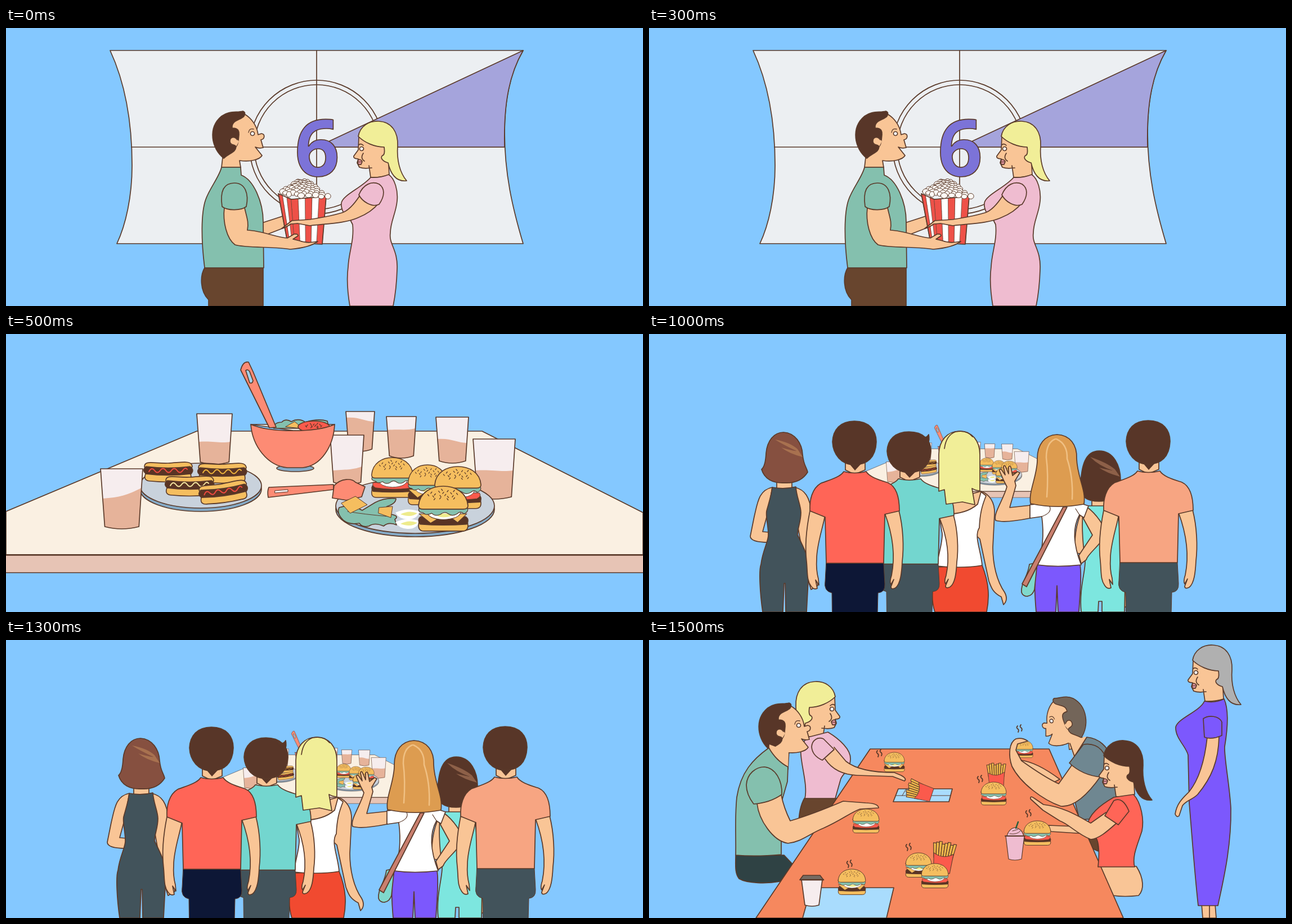
These frames come from a looping animation (1132x495 px, 2 s). An HTML page with a canvas:

```html
<!DOCTYPE html>
<html lang="en">
<head>
<meta charset="utf-8">
<style>
html, body { margin: 0; height: 100%; overflow: hidden; background: #84c8ff }
canvas { display: block }
</style>
</head>
<body>
<canvas id="stage" width="1132" height="495"></canvas>
<script>
const c = document.getElementById('stage').getContext('2d');
const SKY = '#84c8ff', INK = '#5a3a2a', SKIN = '#f9c596', PINK = '#efbcd0', GREEN = '#84c0ae', BUN = '#f5be5f',
  RED = '#fb5a4c', SLATE = '#42535b', VIOLET = '#7c58fd', BROWN = '#583628', BLONDE = '#f1ee98', CREAM = '#f6edee', MAT = '#a9dcfd';

function shape(fill, d, width = 1.7, ink = INK) {
  const path = new Path2D(d);
  if (fill) { c.fillStyle = fill; c.fill(path); }
  if (width) { c.lineWidth = width; c.strokeStyle = ink; c.stroke(path); }
}
const line = (d, width, ink) => shape(null, d, width, ink);
const oval = (fill, x, y, rx, ry = rx, width) =>
  shape(fill, `M${x - rx} ${y}a${rx} ${ry} 0 1 0 ${2 * rx} 0a${rx} ${ry} 0 1 0 ${-2 * rx} 0Z`, width);
function at(x, y, sx, sy, draw, turn = 0) {
  c.save();
  c.translate(x, y);
  c.rotate(turn);
  c.scale(sx, sy);
  draw();
  c.restore();
}

// ---- profile heads ----
function manHead(hair) {
  shape(SKIN, 'M386 222L383 248H417L415 236C435 239 451 234 455 227L443 212Q450 215 457 213L453 199C460 198 461 189 454 188L448 190C446 173 435 160 425 154L395 170Z');
  shape(hair, 'M387 232C365 215 358 178 383 157C396 147 410 151 421 148Q427 150 423 157C418 164 400 164 402 178C415 178 414 186 414 190L413 200Q412 208 409 211C408 222 398 222 387 232Z');
  shape(SKIN, 'M411 198C405 191 397 195 398 203C400 211 406 206 409 211L414 202', 0);
  line('M411 199C405 191 397 195 398 203C400 210 405 206 409 211');
  oval('#fff', 438, 188, 3.5);
  line('M431 186Q432 178 440 180', 1.3);
}
function womanHead(hair) {
  shape(SKIN, 'M645 245L648 266Q665 267 681 262L679 225L660 190L627 193L626 217L618 228Q617 233 626 233L624 240L628 248Q636 251 650 249');
  shape(hair, 'M626 193C629 175 645 165 662 166C686 167 697 186 696 210C694 235 700 258 712 272C695 274 684 262 679 240C670 238 664 231 669 227Q674 226 672 212C655 212 637 204 626 193Z');
  oval('#fff', 632, 215, 3.5);
  shape('#dc909a', 'M626 234Q632 234 633 238L631 243Q625 244 625 240Z');
  line('M625 239L632 238', 1);
  line('M627 208Q631 205 635 209M635 223Q629 232 637 237');
}

// ---- food ----
function seeds(count, cx, cy, rx, ry) {
  for (let i = 0; i < count; i++) {
    const a = i * 2.4, r = Math.sqrt((i + .5) / count);
    line(`M${cx + rx * r * Math.cos(a)} ${cy + ry * r * Math.sin(a)}l${i % 2 ? 2 : -2} 2.5`, 1.3);
  }
}
function burger(x, y, width, tomato, height = width * .88) {
  at(x, y, width / 90, height / 79, () => {
    shape(BUN, 'M3 62H87Q91 78 78 78H12Q-1 78 3 62Z');
    shape('#5a3424', 'M6 53H84Q91 58 86 66Q45 69 5 66Q-1 58 6 53Z');
    if (tomato) shape(RED, 'M5 49H85Q90 55 80 60Q45 64 10 59Q2 55 5 49Z', 1);
    else shape(BUN, 'M3 48L23 64L40 54H58L70 63L86 48Z', 1);
    shape('#fff', 'M16 43H76Q75 57 45 58Q18 57 16 43Z', 1);
    if (!tomato) shape('#eeeb8d', 'M32 49Q45 46 61 49Q58 54 46 54Q35 54 32 49Z', 0);
    shape(GREEN, 'M3 38H87Q90 44 81 48Q75 42 69 48Q61 53 54 48Q47 43 40 49Q31 53 25 47Q15 52 10 46Q0 45 3 38Z', 1.2);
    shape(BUN, 'M2 34C4 10 25 0 45 0S86 10 88 34Q88 40 80 40H10Q2 40 2 34Z');
    seeds(19, 45, 14, 28, 10);
  });
}
function hotdog(x, y, sauce, turn) {
  at(x, y, 1, 1, () => {
    shape(BUN, 'M2 9C2-3 20 4 44 3S86-3 87 9L84 15H5Z');
    shape('#5a3424', 'M5 9Q44 14 83 9Q92 15 84 23Q44 28 6 23Q-4 16 5 9Z');
    line('M10 18q5-9 10-2t10 0t10 0t10 0t10 0t10 0t8-2', 2, sauce);
    shape(BUN, 'M4 22Q44 27 84 22Q88 36 74 35Q44 38 14 35Q-1 35 4 22Z');
  }, turn);
}
function glass(x, y, w, h, left, right) {
  const edge = level => .1 * w * (level - y) / h, bottom = y + h - 4;
  const base = `L${x + w * .91} ${bottom}Q${x + w / 2} ${y + h + 4} ${x + w * .1} ${bottom}Z`;
  shape(CREAM, `M${x} ${y}H${x + w}${base}`, 0);
  shape('#e6b39a', `M${x + edge(left)} ${left}C${x + w * .45} ${left - 2} ${x + w * .65} ${(left + right) / 2 + 3} ${x + w - edge(right)} ${right}${base}`, 0);
  line(`M${x} ${y}H${x + w}${base}`);
}
function plate(x, y, rx, ry) {
  oval('#85aac6', x, y + 6, rx, ry);
  oval('#c9d2dc', x, y, rx, ry);
}
function fries(x, y, size, turn = 0) {
  at(x, y, size, size, () => {
    for (let i = 0; i < 8; i++) shape('#efb84c', `M${i * 4 + 3} 28L${i * 5 - 1} ${3 - i % 3 * 2}h5L${i * 4 + 7} 28Z`, 1.2);
    shape(RED, 'M2 20Q19 30 36 18L34 52H6Z', 1);
  }, turn);
}
function steam(x, y) {
  for (const dx of [0, 6]) line(`M${x + dx} ${y - dx / 3}q-3 3 0 5t1 6`, 1.8);
}

// ---- scenes ----
function stripe(top, bottom, count) {
  const edge = ([x1, y1, x2, y2], k) => `${x1 + (x2 - x1) * k} ${y1 + (y2 - y1) * k}`;
  for (let i = 0; i < count; i++)
    shape(i % 2 ? '#fff' : '#ee5148', `M${edge(top, i / count)}L${edge(top, (i + 1) / count)}L${edge(bottom, (i + 1) / count)}L${edge(bottom, i / count)}Z`, .6);
}
function cinema() {
  shape('#eceff2', 'M185 40H919C895 80 886 130 886 185C886 260 900 320 919 384H197C213 350 224 300 224 245C224 180 215 105 185 40Z');
  line('M223 212H886M552 40V384');
  oval(null, 552, 212, 119);
  oval(null, 552, 212, 111);
  shape('#a5a4dc', 'M552 212L919 40C896 80 884 130 886 212Z');
  c.font = '700 140px "Open Sans", sans-serif';
  c.textAlign = 'center';
  c.fillStyle = '#7c73d8';
  c.fillText('6', 553, 264);
  c.strokeText('6', 553, 264);

  shape(SKIN, 'M455 347L498 333L501 353L455 371Z');
  stripe([484, 295, 507, 305], [500, 380, 513, 383], 3);
  stripe([507, 305, 569, 300], [513, 383, 562, 385], 5);
  line('M484 295L507 305L569 300L562 385L513 383L500 380Z');
  for (let i = 0; i < 60; i++) {
    const v = i / 60, u = i * .618 % 1 * 2 - 1;
    oval('#fffaf5', 528 + u * (9 + 39 * v), 273 + 26 * v + u * 3 * v, 4.5 + i % 3 * .8, 4 + i % 2, 1);
  }

  shape('#68452e', 'M353 427H457V495H360V484C344 468 345 440 353 427Z');
  manHead(BROWN);
  shape(GREEN, 'M383 248H417L418 262C440 270 457 310 457 345L458 427H353C347 380 346 330 355 305C362 285 379 265 383 248Z');
  shape(SKIN, 'M388 320C385 345 392 375 407 386C425 392 480 389 505 394Q540 391 554 380Q535 384 522 379L510 376L519 370Q519 366 512 367L500 374C480 373 455 361 429 360C432 345 427 335 424 320');
  shape(GREEN, 'M384 318C380 290 387 276 406 276S432 295 427 318C418 325 394 326 384 318Z');

  womanHead(BLONDE);
  shape(PINK, 'M648 266Q665 267 680 261C691 268 697 290 695 308C693 330 683 345 683 365C680 385 697 395 695 430Q694 465 688 495H611C606 465 606 440 608 425C609 400 619 378 616 350L612 342C600 335 595 320 596 312C597 298 633 284 648 266Z');
  shape(SKIN, 'M629 298C618 315 607 326 597 329C570 337 555 338 540 341L508 343L490 357Q500 354 506 349L518 348L540 352C575 348 605 347 625 338Q650 328 663 311');
  shape(PINK, 'M627 297C635 278 650 272 663 278C673 285 674 298 663 314C650 320 633 309 627 297Z');
}

function feast() {
  shape('#faf0e2', 'M339 173H846L1132 318V393H0V316Z');
  shape('#e7c4b5', 'M-2 393H1134V425H-2Z');
  line('M0 393.5H1132', 2.4);
  glass(604, 138, 51, 71, 149, 156);
  glass(676, 147, 53, 74, 171, 168);
  glass(764, 148, 58, 82, 187, 194);
  glass(830, 187, 75, 107, 243, 243);
  glass(339, 142, 63, 90, 192, 192);
  glass(576, 180, 60, 88, 243, 236);

  oval('#85aac6', 514, 239, 33, 6);
  shape('#e6e6e2', 'M435 161H584Q550 175 510 172Z');
  shape(GREEN, 'M476 168Q476 157 490 157Q497 150 507 156Q520 149 532 157Q555 150 571 155L574 168Z');
  shape(BUN, 'M497 165L513 156L527 168Z', 1);
  oval(RED, 547, 165, 28, 10);
  seeds(12, 547, 162, 18, 4);
  shape('#fd8b74', 'M417 64Q421 48 431 50L439 67L480 166L468 167Z');
  shape('#a4d0e8', 'M426 65Q430 62 433 67L439 83Q438 89 433 87Z');
  shape('#fd8b74', 'M435 161C470 176 550 176 584 161C582 200 560 235 527 238H500C465 235 438 200 435 161Z');

  plate(346, 270, 108, 40);
  hotdog(244, 227, '#f14a40');
  hotdog(340, 229, '#eeb33b');
  hotdog(282, 252, '#f4e6a0');
  hotdog(340, 270, '#f14a40', -.14);
  glass(168, 240, 75, 107, 293, 274);

  plate(727, 306, 141, 49);
  shape('#fd8b74', 'M467 273L582 268V277L466 291Q464 280 467 273Z');
  shape(CREAM, 'M478 279L501 277V281L478 283Z', 1);
  shape('#fd8b74', 'M580 292L583 270C596 256 615 257 621 264L638 272L632 290L605 296Z');
  shape(GREEN, 'M592 309Q612 302 633 314L656 300Q674 291 693 293Q693 302 677 307Q669 315 684 321Q700 324 691 330L694 340Q680 334 671 342Q655 335 645 342Q633 345 628 337Q610 340 600 332Q587 320 592 309Z');
  line('M607 316Q635 321 681 325', 1);
  shape(BUN, 'M596 301L621 289L642 304L612 319Z', 1);
  shape(BUN, 'M663 309L687 307L684 327L662 319Z', 1);
  for (const y of [321, 338]) {
    shape('#fff', `M692 ${y - 3}Q712 ${y - 13} 735 ${y - 5}Q730 ${y + 10} 713 ${y + 9}Q698 ${y + 8} 692 ${y - 3}Z`, 0);
    shape('#eeeb8d', `M701 ${y}Q716 ${y - 8} 731 ${y - 2}Q720 ${y + 7} 701 ${y}Z`, 0);
  }
  burger(648, 220, 77, true, 72);
  burger(713, 233, 72, false, 72);
  burger(760, 236, 86, true);
  burger(731, 271, 92, false);
}

function backMan(shirt, pants) {
  shape(SKIN, 'M286 315L313 322C309 345 298 375 298 400C297 415 298 425 301 436L302 447L296 438L299 453Q293 456 288 449C280 438 282 425 280 405C277 380 279 350 286 315Z');
  shape(SKIN, 'M419 319L444 314C452 345 453 380 450 405C449 425 447 445 438 452Q430 456 430 450L435 437L430 446Q427 442 431 430C437 400 436 365 419 319Z');
  shape(pants, 'M315 408H417L419 445Q420 460 407 461L405 540H326L325 461Q310 458 313 440Z', 1);
  shape(SKIN, 'M349 225V242L365 250L384 242V225Z');
  shape(BROWN, 'M355 230L366 243L378 230Z', 0);
  shape(shirt, 'M346 245Q365 250 386 245C392 255 410 260 425 265C440 272 445 290 445 315L419 321L417 408H315L313 326L286 315C285 295 290 275 305 266C320 260 340 255 346 245Z');
  shape(BROWN, 'M365 155C392 155 404 172 404 192C403 220 388 233 365 233S327 215 326 192C327 170 340 155 365 155Z');
}
function crowd() {
  at(364, 145, .344, .344, feast);

  // dark jumpsuit
  shape(SKIN, 'M219 273C195 278 193 300 187 325L180 360Q180 371 213 371V353L202 352L212 315Z');
  shape(SKIN, 'M259 273C277 277 286 290 289 320L300 448L288 455L280 430L264 340Z');
  shape(SKIN, 'M227 260V276H254V260Z');
  shape(SLATE, 'M219 273Q240 277 261 272C262 290 270 305 270 318C270 335 264 345 264 358C275 380 285 400 284 420L280 495H243L242 444H240L238 495H202C197 460 195 420 199 410C202 385 212 370 212 358C212 340 207 325 209 315C213 300 218 285 219 273Z');
  shape('#865040', 'M239 175C260 176 272 195 273 215C275 235 280 236 282 246C272 262 255 266 240 265C220 266 205 258 200 241Q207 235 208 212C210 190 222 175 239 175Z');
  shape('#a8714f', 'M224 188Q251 193 264 205L273 219Q249 213 235 202Q258 209 262 208Q240 198 224 188Z', 0);

  // blonde, body
  shape(SKIN, 'M590 280C605 285 615 300 614 320L611 380C611 410 618 440 632 460Q639 473 630 482L626 468C610 460 608 450 604 440L588 365L538 318L537 295Z');
  shape('#f14a30', 'M513 415L592 412C605 445 605 470 600 495H508C500 470 503 445 513 415Z');
  shape('#fff', 'M515 320Q560 324 584 303L590 281L599 288C592 305 588 320 587 345C577 360 590 385 592 412Q555 418 511 413C515 390 522 370 521 355Z');
  at(97, 30, 1, .93, () => backMan('#73d6cf', SLATE));
  shape(BROWN, 'M480 183Q491 187 497 179Q499 188 495 199Z', 0);
  line('M484 183Q492 187 497 179Q499 188 496 195');
  backMan('#ff6557', '#0d1736');
  shape(BLONDE, 'M515 280V215C515 190 530 173 552 173S588 190 588 215V279Q581 279 574 275L579 304L557 299L528 303L525 277Z');
  line('M525 204Q528 180 545 174Q565 170 575 183');

  // turquoise dress
  shape(SKIN, 'M775 306C762 325 755 355 757 390L776 392Z');
  shape(SKIN, 'M828 306Q845 340 843 400L849 485L838 490Z');
  shape(SKIN, 'M787 293V308H810V293Z');
  shape('#7de6df', 'M773 306H832L846 440L845 495H805V476H799L798 495H768C764 450 777 420 775 400C770 370 768 330 773 306Z');
  shape(BROWN, 'M800 208C826 208 838 235 838 260C838 287 830 296 800 298C778 298 766 290 767 270C768 235 775 208 800 208Z');
  shape('#8d6048', 'M784 219Q814 229 828 241L837 254Q812 247 800 238Q821 243 824 243Q800 235 784 219Z', 0);

  // waving with a shoulder bag
  shape(SKIN, 'M678 305L641 309L652 270L650 262L659 247L655 245L646 252L643 237Q641 233 639 237V249L633 235Q630 233 630 237L633 251L626 241Q622 240 623 244L630 260L636 272C630 295 611 320 616 332Q632 337 677 328Z');
  shape(SKIN, 'M778 308C795 320 812 345 811 355C805 375 780 390 777 402L768 409L764 394L788 358L770 325Z');
  shape(VIOLET, 'M690 411H766C769 430 766 460 764 495H727L725 448L723 495H688C685 460 684 435 690 411Z');
  shape('#fff', 'M677 304Q705 300 765 301L781 306L773 327L765 322C752 345 754 375 768 411Q725 416 690 411C700 385 702 355 698 325L677 328Z');
  line('M712 307Q717 318 698 325M765 322L758 311', 1.2);
  shape('#7fd9cc', 'M676 410L690 407L685 455C680 470 665 470 662 460C660 445 674 430 676 410Z');
  shape('#c97f6e', 'M736 308H743L671 450L663 445Z');
  shape('#dd9c50', 'M725 179C748 180 761 197 760 222C761 255 777 277 773 303Q725 312 678 302C674 280 691 250 690 222C690 197 703 180 725 179Z');
  line('M722 187Q706 193 706 220Q710 250 707 290M724 187Q744 196 743 222Q754 255 752 294', 2.5, '#f0c083');
  at(522, -1, 1, 1, () => backMan('#f7a582', SLATE));
}

function diner() {
  // seated bodies behind the table
  shape('#68452e', 'M276 282H345L320 330H266Q266 300 276 282Z');
  at(957, -92, -1, 1, () => womanHead(BLONDE));
  shape(PINK, 'M283 173L318 164C338 176 359 195 358 212C357 235 342 238 340 250L331 282H277C282 260 272 230 270 205C268 190 276 178 283 173Z');
  shape('#2f4244', 'M154 383H240L256 400L233 430C210 434 175 434 160 425C152 415 154 400 154 383Z');
  shape(SKIN, 'M213 190L211 205L247 230L249 195Z');
  at(-172, -36, 1, 1, () => manHead(BROWN));
  shape(SKIN, 'M214 186L213 198L247 228L248 199Z', 0);
  shape(GREEN, 'M213 192Q226 215 247 226L246 252L235 290V382Q190 386 154 383C155 355 152 320 156 280C163 235 185 212 213 192Z');
  shape('#68452e', 'M780 345L798 355V376L785 370Z');
  shape(SKIN, 'M798 403H866C880 425 880 445 870 455Q845 458 825 455Z');
  shape('#f6885e', 'M393 194H711L843 495H190Z');

  shape(MAT, 'M443 265H539L533 288H434Z');
  line('M439 277H536M457 265L450 277', 1);
  shape(MAT, 'M288 441H435L422 495H273Z');
  burger(417, 200, 38, false, 35);
  steam(406, 197);
  fries(455, 278, .85, -1.25);
  fries(601, 220, .85);
  burger(589, 253, 47, true);
  steam(585, 243);
  burger(361, 301, 49, true);
  fries(507, 358, 1.03, .14);
  burger(455, 379, 48, false, 44);
  burger(483, 398, 50, true);
  steam(458, 364);
  burger(335, 408, 51, false, 46);
  steam(353, 394);
  shape(CREAM, 'M271 427H308L302 472Q290 476 277 472Z');
  shape('#756b62', 'M274 419H304L310 427H268Z');
  line('M269 427H310', 2.5);

  // left side arms
  shape(SKIN, 'M313 212C325 230 345 240 370 241L433 243L454 251Q459 247 448 241L436 236C390 236 365 228 350 216L329 191');
  shape(PINK, 'M289 190C290 178 300 172 310 176L329 195L308 214Q290 206 289 190Z');
  shape(SKIN, 'M192 291C195 320 220 358 247 362C270 360 285 345 310 335C340 322 360 306 375 301L408 299Q408 291 385 290L345 287C315 300 275 315 251 322Q240 300 235 276');
  shape(GREEN, 'M173 258C174 238 190 226 205 226C225 228 237 250 236 275Q215 290 186 292Q173 275 173 258Z');

  // right man
  burger(650, 179, 33, true, 31);
  steam(655, 153);
  at(1036, -122, -.86, .95, () => manHead('#736559'), -.25);
  shape(SKIN, 'M748 182L755 212L787 182L775 172Z', 0);
  line('M748 184L756 207');
  shape(SKIN, 'M661 214Q690 218 730 248L718 254Q690 245 661 214Z');
  shape('#6f8791', 'M778 173C800 175 815 190 822 210L835 295L800 318L765 320L757 288L750 217Z');
  shape(SKIN, 'M803 242C780 275 755 298 732 296C700 285 660 255 645 225C638 205 640 182 652 176Q664 173 673 180L655 185L652 196L662 215C690 235 715 250 728 256L752 222');
  shape('#6f8791', 'M772 186C800 182 815 203 812 225L803 244Q770 241 747 219Z');

  // right woman
  shape(SKIN, 'M710 330L782 333L792 346L714 341Z');
  burger(665, 322, 50, true);
  steam(671, 304);
  at(182, 13, 1, 1, () => womanHead(BROWN));
  shape('#ff6557', 'M826 280L861 275C875 290 880 320 876 340C868 365 858 385 863 404H798C800 385 800 365 796 355L778 332C782 310 800 295 826 280Z');
  shape(SKIN, 'M832 325C815 340 800 354 785 355C760 345 745 327 730 322L700 303L678 283Q677 276 685 282L701 293C740 298 765 315 785 326L812 307');
  shape('#ff6557', 'M810 313L826 286Q842 278 853 305L834 329Z');
  shape(PINK, 'M634 349H667L662 390Q650 394 639 390Z', 1.2);
  shape(PINK, 'M636 349Q640 335 651 334Q663 336 666 349Z', 1.2);
  line('M641 345Q654 347 660 340M646 340L656 337', 1);
  line('M652 335L656 324', 2.5, '#27603f');
  line('M633 349H668', 2);

  // standing woman
  shape(SKIN, 'M982 470H1006L1008 495H984Z');
  line('M996 473V495');
  at(340, -157, 1, 1, () => womanHead('#b0b0b0'));
  shape(VIOLET, 'M987 109Q1005 113 1022 105C1031 125 1028 160 1023 190C1022 210 1032 260 1034 300C1035 370 1020 430 1011 473H976C970 420 965 350 960 290L958 205C955 190 935 175 936 155C940 139 978 128 987 109Z');
  shape(SKIN, 'M992 173C988 210 980 245 960 270C950 280 938 290 935 310Q938 317 942 313L948 295C955 285 965 285 975 275C1000 245 1012 215 1013 172Z');
  shape(VIOLET, 'M985 140C995 133 1013 135 1018 146V170Q1000 178 987 173Z');
}

const scenes = [cinema, feast, crowd, diner];
c.lineJoin = c.lineCap = 'round';
function frame() {
  c.fillStyle = SKY;
  c.fillRect(0, 0, 1132, 495);
  scenes[Math.floor(performance.now() / 500) % scenes.length]();
  requestAnimationFrame(frame);
}
frame();
</script>
</body>
</html>
```
